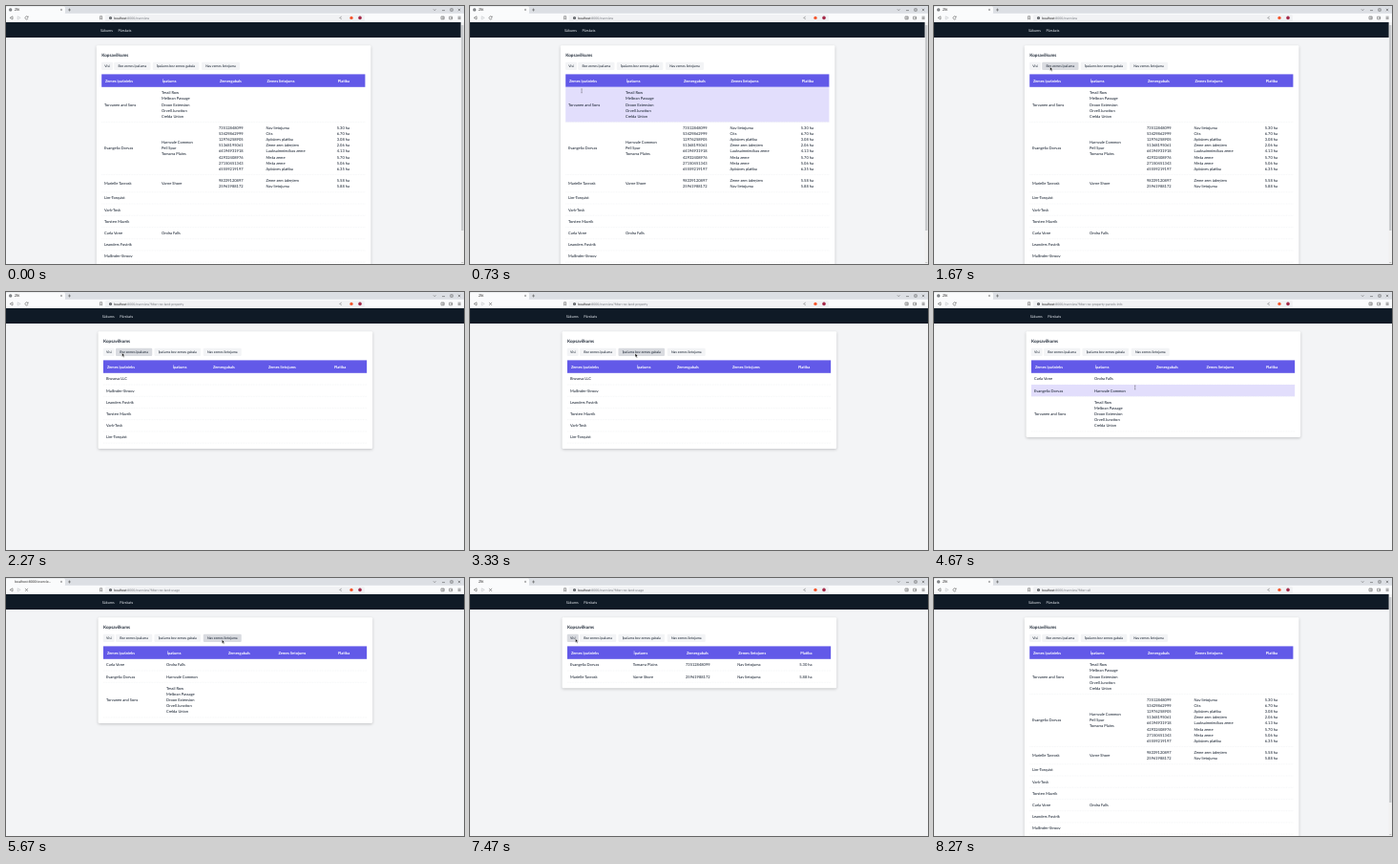
Animation, 480 px wide and 270 px high, one loop 8.54 s. Source, as an HTML page:

```html
<!DOCTYPE html>
<html lang="lv">
<head>
<meta charset="utf-8">
<title>Kopsavilkums</title>
<style>
html, body { margin: 0; width: 100%; height: 100%; overflow: hidden; }
svg { display: block; width: 480px; height: 270px; }
text { font-family: Lato, "Noto Sans", sans-serif; font-weight: 500; text-rendering: geometricPrecision; white-space: pre; }
#card { filter: drop-shadow(0 1px 1.5px #0003); }
</style>
</head>
<body>
<svg viewBox="0 0 480 270">
  <g id="screen"></g>
  <g id="cursor" stroke="#fff" stroke-width=".5">
    <path id="arrow" d="M0 0V4.3L1 3.4L1.7 5L2.5 4.6L1.8 3.1H3.1Z" fill="#111"/>
    <path id="beam" d="M-.6 -2H.6M0 -2V2M-.6 2H.6" stroke="#333" stroke-width=".35"/>
  </g>
</svg>
<script>
const LOOP = 8540, LINE = 6.11, TOP = 84.8;
const $ = id => document.getElementById(id);

const HEADS = ['Zemes īpašnieks', 'Īpašums', 'Zemesgabals', 'Zemes lietojums', 'Platība'];
const BUTTONS = [['Visi', 100, 12], ['Bez zemes īpašuma', 113.2, 38.3],
  ['Īpašums bez zemes gabala', 153.7, 48.6], ['Nav zemes lietojuma', 205, 40]];
const STREETS = 'Tessil Row|Melbran Passage|Droon Extension|Orvell Junction|Crelda Union';
const names = list => list.split('|').map(name => [name]);

const VIEWS = {
  all: { cols: [103, 163, 223, 272.6, 346.8], scroll: true, rows: [
    ['Torvanen and Sons', STREETS],
    ['Evangelia Dorvas', 'Harnvale Common|Pell Spur|Tomarra Plains',
      '73512848099|53429862999|12976258905|51368195061|64194931918|42932408976|27150451343|65559219197',
      'Nav lietojuma|Cits|Apbūves platība|Zeme zem ūdeņiem|Lauksaimniecības zeme|Meža zeme|Meža zeme|Apbūves platība',
      '5.30 ha|6.70 ha|3.08 ha|2.06 ha|4.13 ha|5.70 ha|5.06 ha|6.35 ha'],
    ['Marielle Tavrosk', 'Varne Shore', '98339120897|25961988172', 'Zeme zem ūdeņiem|Nav lietojuma', '5.58 ha|5.88 ha'],
    ...names('Lim-Torquist|Vark-Tosk|Torsten Mavrik'),
    ['Carla Vone', 'Ondra Falls'],
    ...names('Leanders Fostrik|Mallinder-Stroov|Brusova LLC')] },
  noProperty: { cols: [105, 174, 216, 274, 343], rows:
    names('Brusova LLC|Mallinder-Stroov|Leanders Fostrik|Torsten Mavrik|Vark-Tosk|Lim-Torquist') },
  noParcel: { cols: [105, 168, 232, 284.5, 347], rows: [
    ['Carla Vone', 'Ondra Falls'], ['Evangelia Dorvas', 'Harnvale Common'], ['Torvanen and Sons', STREETS]] },
  noUsage: { cols: [105, 170.7, 226, 280.3, 345.3], rows: [
    ['Evangelia Dorvas', 'Tomarra Plains', '73512848099', 'Nav lietojuma', '5.30 ha'],
    ['Marielle Tavrosk', 'Varne Shore', '25961988172', 'Nav lietojuma', '5.88 ha']] }
};

// click time, load time, view, query
const VISITS = [
  [-1, 0, 'all', ''],
  [1700, 1930, 'noProperty', '?filter=no-land-property'],
  [3230, 3530, 'noParcel', '?filter=no-property-parcels-info'],
  [5560, 5730, 'noUsage', '?filter=no-land-usage'],
  [7300, 7600, 'all', '?filter=all']
];

// time, x, y
const PATH = [[70, 70, 24], [500, 115, 112], [870, 118, 78], [930, 118, 76], [1400, 121.5, 63.5],
  [2470, 121.5, 63.5], [2670, 173, 64], [3930, 173, 64], [4000, 185, 75], [4270, 185, 75],
  [4330, 194, 138], [4400, 194, 138], [4930, 226.3, 64.3], [5930, 226.3, 64.3], [6730, 113, 70],
  [6800, 113, 70], [7130, 110.4, 63.3], [7870, 110.4, 63.3], [8270, 11, 152]];

const rect = (x, y, w, h, fill, r = 0, more = '') =>
  `<rect x="${x}" y="${y}" width="${w}" height="${h}" rx="${r}" fill="${fill}" ${more}/>`;
const text = (s, x, y, size = 4, fill = '#1f2937', more = '') =>
  `<text x="${x}" y="${y + size * .35}" font-size="${size}" fill="${fill}" ${more}>${s}</text>`;
const line = (d, color = '#444', width = .5, more = '') =>
  `<path d="${d}" fill="none" stroke="${color}" stroke-width="${width}" ${more}/>`;
const dot = (x, y, r, fill) => `<circle cx="${x}" cy="${y}" r="${r}" fill="${fill}"/>`;

const lines = cell => cell.split('|');
const rowHeight = row => LINE * (1 + Math.max(...row.map(cell => lines(cell).length)));

function browser(title, query, loading) {
  return rect(0, 0, 480, 8, '#dcdfe4') + rect(0, .5, 62, 8, '#fafbfc', 1.5)
    + rect(0, 7.8, 480, 9.2, '#fafbfc') + rect(104, 9, 272, 7, '#f1f2f4', 1.5)
    + (loading ? '' : dot(4.7, 3.9, 1.6, '#5f6368') + line('M3.2 3.9H6.2M4.7 2.4V5.4', '#ddd', .3))
    + text(title, 9, 4, 3.5, '#333')
    + line('M57.2 3.1L58.8 4.7M58.8 3.1L57.2 4.7M65 4H68M66.5 2.5V5.5')
    + line('M448 3.4L449.2 4.6L450.4 3.4M457 4.6H460M473.8 2.8L476.2 5.2M476.2 2.8L473.8 5.2M465.8 2.8H468.2V5.2H465.8Z')
    + line('M7 10.8L4 12.4L7 14Z') + line('M12.2 10.8L15.2 12.4L12.2 14Z', '#b5b8bc')
    + line(loading ? 'M20 10.9L23 13.9M23 10.9L20 13.9' : 'M22.9 11.5A1.6 1.6 0 1 0 23.1 13M23.2 10.6V11.9H21.9')
    + line('M98.6 10.7H100.6V14L99.6 13.2L98.6 14Z')
    + dot(109.5, 12.4, 1.5, '#4b4f54') + line('M109.5 12.2V13.3M109.5 11.4V11.7', '#fff', .4)
    + text(`localhost<tspan fill="#777b80">:8000/overview${query}</tspan>`, 113, 12.4, 3.4, '#222')
    + line('M351.8 11.1L349.6 12.4L351.8 13.7', '#666')
    + dot(362, 12.4, 1.7, '#f4572e') + dot(371, 12.4, 1.8, '#a52a4a')
    + line('M456 11H459.2V13.8H456ZM458 11V13.8M464.6 11.2H467.6V13.8H464.6ZM466.4 12.5H467.6M473.6 11.2H476.6M473.6 12.4H476.6M473.6 13.6H476.6');
}

function page(view, hover) {
  const dx = view.scroll ? 0 : 1.75;
  const height = view.rows.reduce((sum, row) => sum + rowHeight(row), 0);
  let out = rect(0, 17, 480, 253, '#f3f4f6') + rect(0, 17, 480, 16, '#0f1a26')
    + text('Sākums', 99 + dx, 25.2, 3.8, '#d5dae0') + text('Pārskats', 117.5 + dx, 25.2, 3.8, '#d5dae0')
    + rect(94.8 + dx, 41.3, 287.6, TOP + height + 6 - 41.3, '#fff', 1.3, 'id="card"')
    + text('Kopsavilkums', 100.2 + dx, 51, 4.6, '#1f2937', 'font-weight="700" style="font-weight:700"');
  BUTTONS.forEach(([label, x, w], i) => {
    out += rect(x + dx, 58.7, w, 8.3, hover === 'b' + i ? '#d9dbe0' : '#f3f4f6', 1.3)
      + text(label, x + dx + w / 2, 62.8, 3.5, '#1f2937', 'text-anchor="middle"');
  });
  out += rect(100.2 + dx, 71.4, 276.2, TOP - 71.4, '#6259e8');
  HEADS.forEach((head, i) => out += text(head, view.cols[i] + .9, 78.4, 4, '#fff', 'style="font-weight:700"'));
  let y = TOP;
  view.rows.forEach((row, r) => {
    const h = rowHeight(row);
    if (hover === 'r' + r) out += rect(100.2 + dx, y, 276.2, h, '#e2defc');
    out += line(`M${100.2 + dx} ${y + h}h276.2`, '#dfe2e6', .3, 'stroke-dasharray="1 .6"');
    row.forEach((cell, c) => lines(cell).forEach((s, k, all) =>
      out += text(s, view.cols[c], y + h / 2 + (k - (all.length - 1) / 2) * LINE)));
    y += h;
  });
  if (view.scroll) out += rect(476.6, 17, 3.4, 253, '#f1f1f1') + rect(477.2, 20, 2.2, 215, '#c4c6c9')
    + line('M477.5 268.2L478.3 269L479.1 268.2', '#666', .4);
  return out;
}

function cursorAt(t) {
  const i = PATH.findIndex(p => p[0] > t);
  if (i < 1) return null;
  const [t0, x0, y0] = PATH[i - 1], [t1, x1, y1] = PATH[i];
  const p = (t - t0) / (t1 - t0), e = p * p * (3 - 2 * p);
  return [x0 + (x1 - x0) * e, y0 + (y1 - y0) * e];
}

function hoverAt(view, point) {
  if (!point) return '';
  const [x, y] = [point[0] - (view.scroll ? 0 : 1.75), point[1]];
  const b = BUTTONS.findIndex(([, bx, w]) => x >= bx && x <= bx + w && y >= 58.7 && y <= 67);
  if (b >= 0) return 'b' + b;
  let top = TOP;
  const r = view.rows.findIndex(row => y >= top && y < (top += rowHeight(row)));
  return r >= 0 && x > 100 && x < 376.4 ? 'r' + r : '';
}

let shown;
function draw(now) {
  const t = now % LOOP;
  const current = VISITS.filter(v => v[1] <= t).pop();
  const next = VISITS.find(v => v[0] <= t && v[1] > t);
  const committed = next && t > next[1] - 100;
  const view = VIEWS[current[2]], point = cursorAt(t), hover = hoverAt(view, point);
  const title = committed ? 'localhost:8000/overvie…' : 'ZĪK';
  const query = (committed ? next : current)[3];
  const key = [current[2], title, query, !!next, hover].join();
  if (key !== shown) {
    $('screen').innerHTML = page(view, hover) + browser(title, query, !!next);
    shown = key;
  }
  $('cursor').style.display = point ? '' : 'none';
  if (point) $('cursor').setAttribute('transform', `translate(${point})`);
  const overText = hover[0] === 'r';
  $('arrow').style.display = overText ? 'none' : '';
  $('beam').style.display = overText ? '' : 'none';
  requestAnimationFrame(() => draw(performance.now() - start));
}
const start = performance.now();
draw(0);
</script>
</body>
</html>
```
